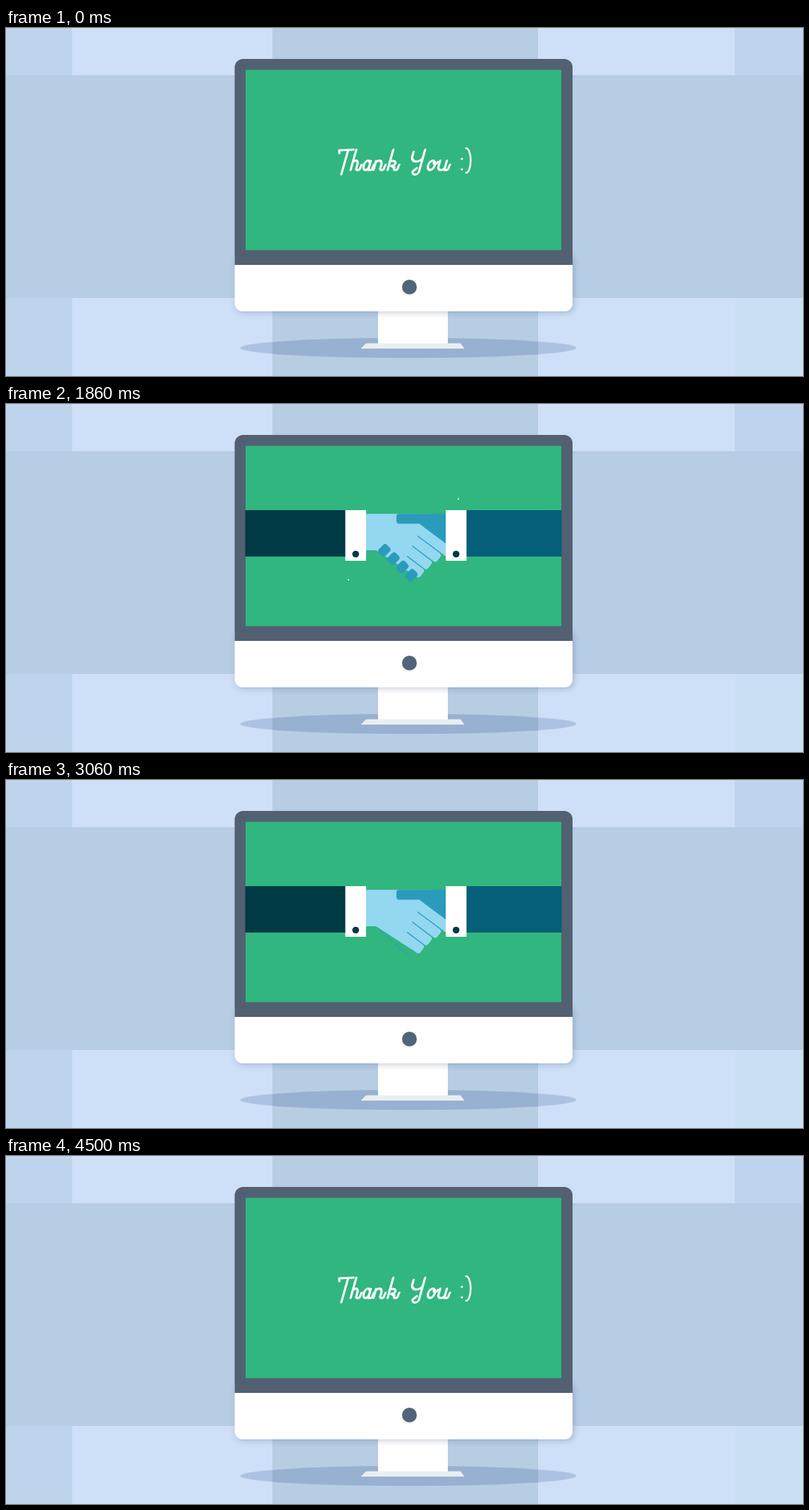
Animation of 1131 by 495 pixels, one loop 4530 ms. Source, as an HTML page with a canvas:

```html
<!DOCTYPE html>
<html lang="en">
<head>
<meta charset="utf-8">
<title>Thank You :)</title>
<style>
html, body { margin: 0; width: 100%; height: 100%; overflow: hidden; background: #b7cde4; }
canvas { display: block; }
</style>
</head>
<body>
<canvas id="stage" width="1131" height="495" role="img" aria-label="Thank You :)"></canvas>
<script>
const ctx = document.getElementById('stage').getContext('2d');
const LOOP = 4530, PI = Math.PI;
const LIGHT = '#93d7f1', BLUE = '#2a9bbb', DARK = '#003a44', TEAL = '#055f78';

const clamp = v => Math.max(0, Math.min(1, v));
const span = (t, start, length) => clamp((t - start) / length);
const inOut = u => u < .5 ? 2 * u * u : 1 - 2 * (1 - u) ** 2;

function rect(x, y, w, h, color) {
  ctx.fillStyle = color;
  ctx.fillRect(x, y, w, h);
}

function round(x, y, w, h, r, color) {
  ctx.fillStyle = color;
  ctx.beginPath();
  ctx.roundRect(x, y, w, h, r);
  ctx.fill();
}

function oval(x, y, rx, ry, color) {
  ctx.fillStyle = color;
  ctx.beginPath();
  ctx.ellipse(x, y, rx, ry, 0, 0, 2 * PI);
  ctx.fill();
}

function poly(points, color) {
  ctx.fillStyle = color;
  ctx.beginPath();
  for (const [x, y] of points) ctx.lineTo(x, y);
  ctx.closePath();
  ctx.fill();
}

function at(x, y, angle, draw) {
  ctx.save();
  ctx.translate(x, y);
  ctx.rotate(angle);
  draw();
  ctx.restore();
}

// Pen strokes for the script lettering; the baseline is y = 0
function line(x, y, ...rest) {
  ctx.moveTo(x, y);
  for (let i = 0; i < rest.length; i += 2) ctx.lineTo(rest[i], rest[i + 1]);
}

const stem = (x, top, bottom = 0) => line(x, top, x, bottom);
const dot = (x, y) => line(x, y, x, y + .1);

function arc(x, y, rx, ry, from, to) {
  ctx.moveTo(x + rx * Math.cos(from), y + ry * Math.sin(from));
  ctx.ellipse(x, y, rx, ry, 0, from, to);
}

function ring(x, rx) {
  arc(x, -6.7, rx, 6.7, 0, 2 * PI);
}

function arch(x, w) {
  arc(x + w / 2, -8, w / 2, 5.3, PI, 2 * PI);
  ctx.lineTo(x + w, -3);
}

function cup(x, w, top, bottom) {
  const r = Math.min(w, bottom - top) / 2;
  ctx.moveTo(x, top);
  ctx.ellipse(x + w / 2, bottom - r, w / 2, r, 0, PI, 0, true);
  ctx.lineTo(x + w, top);
}

function tail(x) {
  cup(x, 5.4, -4, 0);
  ctx.lineTo(x + 6, -7.5);
}

// Each letter: its advance and its strokes
const LETTERS = {
  T: [17.5, () => { line(-4.5, -24, -6, -28, 14, -29); stem(6.6, -28, 6); }],
  h: [17.5, () => { stem(.5, -29); arch(.5, 7.5); tail(8); }],
  a: [15.5, () => { ring(4, 4.2); stem(8, -13); tail(8); }],
  n: [20, () => { stem(0, -13); arch(0, 9); tail(9); }],
  k: [22, () => { stem(0, -29); arc(3.5, -9.5, 5, 3.5, -.8 * PI, PI / 2); ctx.lineTo(8.5, -3); tail(8.5); }],
  Y: [22, () => { cup(-4, 15.5, -26, -12); stem(11.5, -29, 3); arc(7, 2, 4.5, 4.5, 0, PI); ctx.lineTo(7, -2.5); }],
  o: [16, () => { ring(4.6, 4.7); cup(7, 5, -11.5, -9); }],
  u: [21, () => { cup(-.8, 9.5, -13.3, 0); stem(8.7, -13.3); tail(8.7); }],
  ' ': [11.7, () => {}],
  ':': [7, () => { dot(1, -16); dot(1, -1); }],
  ')': [8, () => arc(0, -13.5, 6.5, 17.5, -PI / 2, PI / 2)]
};

function write(text, spacing) {
  let x = 471 - (text.length - 1) / 2 * spacing;
  ctx.strokeStyle = '#fff';
  ctx.lineCap = ctx.lineJoin = 'round';
  for (const char of text) {
    const [advance, strokes] = LETTERS[char];
    const script = /\w/.test(char);
    ctx.save();
    ctx.transform(1, 0, script ? -.28 : 0, 1, x, 202);
    ctx.lineWidth = char === ')' ? 2.6 : 3.2;
    ctx.beginPath();
    strokes();
    ctx.stroke();
    ctx.restore();
    x += advance + spacing;
  }
}

function background() {
  rect(0, 0, 1131, 495, '#b7cde4');
  for (const [y, h, corner] of [[0, 67, '#bdd4ec'], [384, 111, '#c9dff4']]) {
    rect(0, y, 94, h, '#bdd4ec');
    rect(94, y, 284, h, '#cee0f7');
    rect(378, y, 377, h, '#b6cde4');
    rect(755, y, 279, h, '#cee0f7');
    rect(1034, y, 97, h, corner);
  }
}

function monitor() {
  ctx.globalCompositeOperation = 'multiply';
  oval(571, 455, 238.5, 14.3, '#d6dcea');
  ctx.globalCompositeOperation = 'source-over';
  rect(528, 402, 99, 47, '#fff');
  poly([[511, 448.5], [645, 448.5], [650.5, 456], [503.5, 456]], '#eaeff1');
  ctx.save();
  ctx.shadowColor = 'rgba(60,80,110,.28)';
  ctx.shadowBlur = 8;
  ctx.shadowOffsetX = ctx.shadowOffsetY = 2;
  round(324.5, 325, 479.5, 78, [0, 0, 11, 11], '#fff');
  ctx.restore();
  round(324.5, 44, 479.5, 293, [12, 12, 0, 0], '#516172');
  oval(572.5, 368.5, 10.5, 10.5, '#516478');
  rect(340, 59.5, 448, 256.5, '#31b680');
}

function sleeve(x, cuffX, width, color) {
  rect(x, 151, width, 66, color);
  rect(cuffX, 151, 29.5, 72, '#fff');
  oval(cuffX + 14.7, 213.5, 4.8, 4.8, DARK);
}

function leftHand() {
  round(511, 156.5, 98, 13.2, [0, 4, 4, 0], LIGHT);
  poly([[511, 156.5], [586, 156.5], [586, 170], [591, 174], [569, 216], [575.7, 241], [525, 208], [511, 208]], LIGHT);
  // Four parallel fingers, each shorter than the one above
  at(586, 170, Math.atan2(3, 4), () => {
    for (let i = 0; i < 4; i++)
      round(0, 16 * i, 44.8 + 16 * .5 ** i, 14.6, [0, 4, 4, 0], LIGHT);
  });
}

function rightPalm() {
  poly([[560, 157], [625, 157], [625, 213.5], [607, 213.5], [588, 241],
    [577, 241], [541, 206], [543, 201.5], [584, 171]], BLUE);
}

// Fingertips grow and shrink from their outer ends
function tips(scale) {
  const size = 16.5 * scale;
  for (let i = 0; i < 4; i++)
    at(531 + 12.8 * i, 214 + 11.8 * i, -PI / 4, () => round(0, -6.6, size, 13.2, Math.min(4, size / 2), BLUE));
}

function hands(t) {
  const gone = t < 2265 ? 1 - inOut(span(t, 765, 700)) : inOut(span(t, 3090, 680));
  if (gone === 1) return;
  const beat = span(t, 2250, 510);
  const y = -25 * Math.sin(3 * PI * beat) * Math.max(0, Math.sin(PI * beat)) ** 1.5;
  const left = -320 * gone, right = 280 * gone;

  // The tips fold away, then return on the other side of the left hand
  const grip = t > 1540 && t <= 3060;
  const fold = Math.min(Math.abs(t - 1540), Math.abs(t - 3060)) / 130;
  const scale = Math.max(.05, clamp(fold));

  at(left, y, 0, () => sleeve(100, 481.5, 382, DARK));
  at(right, y, 0, () => {
    rightPalm();
    if (!grip) tips(scale);
  });
  at(left, y, 0, leftHand);
  at(right, y, 0, () => {
    round(554, 156.3, 71, 14, [4, 0, 0, 4], BLUE);
    if (grip) tips(scale);
    sleeve(653, 624, 350, TEAL);
  });
}

function sparks(t) {
  if (t < 1110 || t > 2160) return;
  const u = span(t, 1110, 1050), x = 93 * inOut(u);
  const r = (.5 + .8 * u) * (1 - span(t, 2040, 120));
  oval(564 + x, 135.3, r, r, '#fff');
  oval(564 - x, 250, r, r, '#fff');
}

function draw(t) {
  background();
  monitor();
  ctx.save();
  ctx.beginPath();
  ctx.rect(339.5, 59.5, 449, 256.5);
  ctx.clip();
  if (t < 1600 || t > 3090) {
    const open = t < 2265 ? inOut(span(t, 560, 650)) : 1 - inOut(span(t, 3200, 900));
    write('Thank You :)', 9 * open);
  }
  sparks(t);
  hands(t);
  ctx.restore();
}

const begin = performance.now();
function frame() {
  draw((performance.now() - begin) % LOOP);
  requestAnimationFrame(frame);
}
frame();
</script>
</body>
</html>
```
